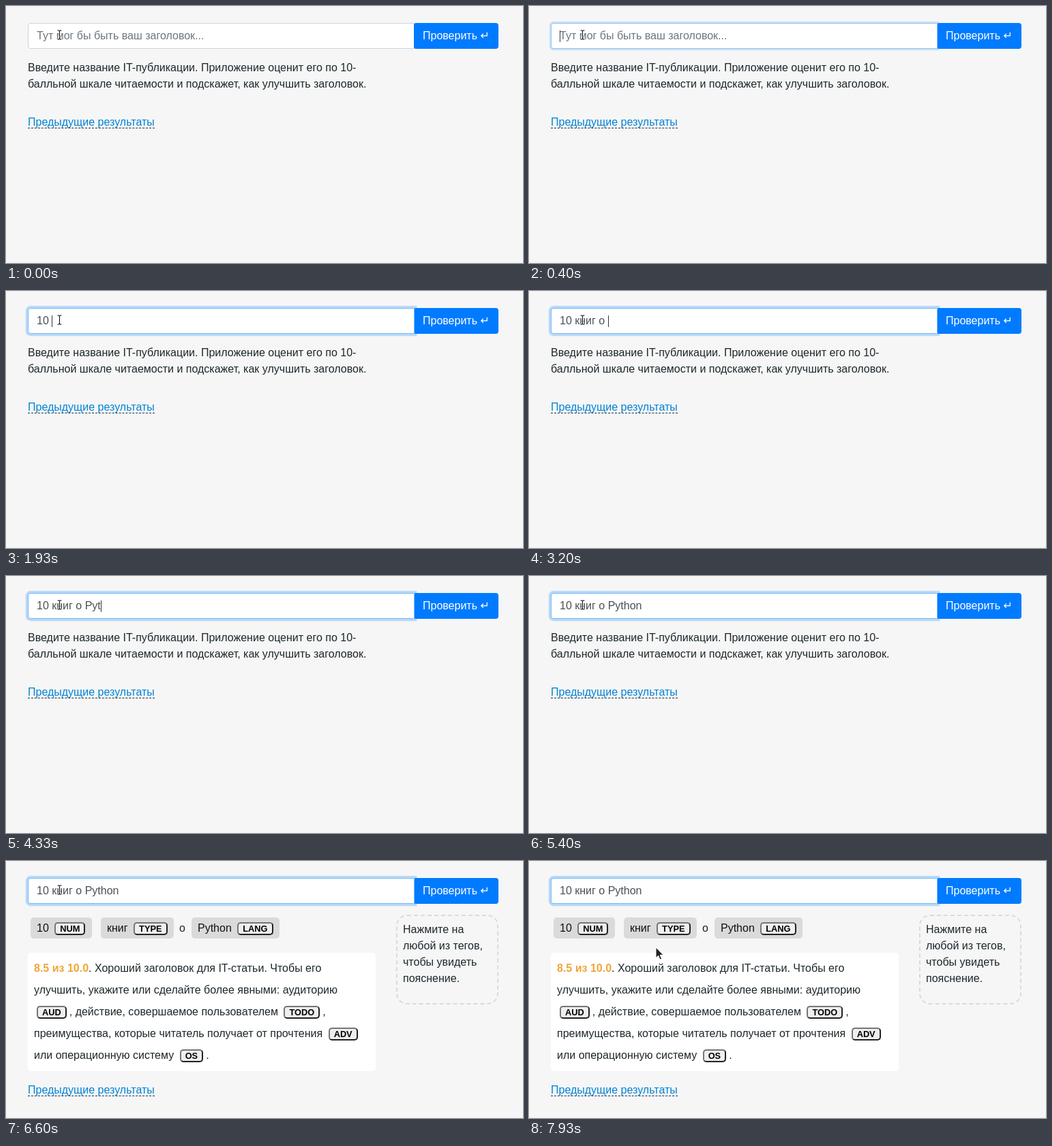
An HTML page for the animation above (8000 ms loop, 758 by 378 pixels).

```html
<!DOCTYPE html>
<html lang="ru">
<head>
<meta charset="utf-8">
<title>Оценка заголовка</title>
<style>
* { box-sizing: border-box; }
html, body { margin: 0; width: 100%; height: 100%; overflow: hidden; }
body {
  position: relative;
  background: #f6f6f6;
  color: #1d272c;
  font: 16px/24px "Liberation Sans", Arial, "DejaVu Sans", sans-serif;
}
.box, .line { position: absolute; white-space: pre; }
#field {
  left: 32px; top: 25px; width: 567px; height: 38px;
  padding: 6px 12px;
  background: #fff;
  border: 1px solid #ced4da;
  border-radius: 4px 0 0 4px;
  color: #495057;
}
#field.on { z-index: 3; }
#hint { color: #6c757d; }
#caret { position: absolute; top: 10px; width: 1px; height: 17px; background: #30373d; }
#check {
  left: 598px; top: 25px; width: 124px; height: 38px;
  padding: 7px 13px;
  background: #007bff;
  border-radius: 3px 4px 4px 3px;
  color: #fff;
  z-index: 2;
}
#link { left: 32px; color: #0083d6; }
#link span { border-bottom: 1px dashed #12304a; }
.tag { top: 83px; height: 31px; padding: 4px 9px; background: #dadada; border-radius: 5px; color: #111; }
kbd {
  display: inline-block;
  margin: 0 4px; padding: 0 6px;
  border: 2px solid; border-color: #767676 #222 #222 #767676;
  border-radius: 5px;
  background: #efefef; color: #000;
  font: bold 12.8px/15px "Liberation Sans", Arial, sans-serif;
}
#card { left: 32px; top: 135px; width: 510px; height: 174px; padding: 7px 9px; background: #fff; border-radius: 5px; line-height: 32px; }
#card div { height: 32px; }
#card b { color: #f0a63a; }
#side { left: 572px; top: 79px; width: 150px; height: 132px; padding: 8px; border: 2px dashed #dadada; border-radius: 16px; }
.mouse { position: absolute; left: 0; top: 0; overflow: visible; z-index: 9; }
</style>
</head>
<body>
<div id="field" class="box"><span id="typed"></span><i id="caret"></i><span id="hint">Тут мог бы быть ваш заголовок...</span></div>
<div id="check" class="box">Проверить ↵</div>

<div id="intro">
  <div class="line" style="left:32px;top:79px">Введите название IT-публикации. Приложение оценит его по 10-
балльной шкале читаемости и подскажет, как улучшить заголовок.</div>
</div>

<div id="result">
  <div class="box tag" style="left:36px;width:90px">10 <kbd>NUM</kbd></div>
  <div class="box tag" style="left:139px;width:107px">книг <kbd>TYPE</kbd></div>
  <div class="line" style="left:254px;top:87px">о</div>
  <div class="box tag" style="left:272px;width:129px">Python <kbd>LANG</kbd></div>
  <div id="card" class="box"><div><b>8.5 из 10.0</b>. Хороший заголовок для IT-статьи. Чтобы его</div><div>улучшить, укажите или сделайте более явными: аудиторию</div><div><kbd>AUD</kbd>, действие, совершаемое пользователем <kbd>TODO</kbd>,</div><div>преимущества, которые читатель получает от прочтения <kbd>ADV</kbd></div><div>или операционную систему <kbd>OS</kbd>.</div></div>
  <div id="side" class="box">Нажмите на
любой из тегов,
чтобы увидеть
пояснение.</div>
</div>

<div id="link" class="line"><span>Предыдущие результаты</span></div>

<svg id="beam" class="mouse" width="1" height="1" fill="none">
  <g id="stem"><path d="M-3 -6.5H-1L0 -5.5L1 -6.5H3M0 -5.5V5.5M-3 6.5H-1L0 5.5L1 6.5H3" stroke="#fff" stroke-width="2.6"/>
  <path d="M-3 -6.5H-1L0 -5.5L1 -6.5H3M0 -5.5V5.5M-3 6.5H-1L0 5.5L1 6.5H3" stroke="#111" stroke-width="1.1"/></g>
</svg>
<svg id="arrow" class="mouse" width="1" height="1">
  <path d="M0 0V15.5L3.6 12.2L6 18L8.6 16.9L6.2 11.3H11Z" fill="#222" stroke="#fff"/>
</svg>

<script>
const LOOP = 8000;
const TITLE = "10 книг о Python";
const $ = id => document.getElementById(id);

// Moment at which each character of the title is typed
const keys = [930, 1330, 1930, 2200, 2470, 2600, 2800, 2930,
              3070, 3200, 3930, 4200, 4330, 4470, 4600, 4800];
// [time, value]; each value holds until the next step
const caret = [[0, 0], [330, 1], [870, 0], [930, 1], [5400, 0],
               [6000, 1], [6600, 0], [7200, 1], [7800, 0]];
const focus = [[0, 0], [330, .1], [400, .7], [470, 1]];
const mouse = [[0, ["beam", 78.5, 42.5]], [7330, ["arrow", 84, 58.5]],
               [7470, ["arrow", 126, 132]], [7530, ["arrow", 150, 176]],
               [7730, ["arrow", 141, 150]], [7930, ["arrow", 186, 127]]];
const SHOW = 5530;

const at = (steps, t) => steps.filter(s => s[0] <= t).pop()[1];
const mix = (a, b, k) => a.map((v, i) => Math.round(v + (b[i] - v) * k));
const show = (id, on) => { $(id).style.display = on ? "" : "none"; };

function draw(t) {
  const count = keys.filter(k => k <= t).length;
  $("typed").textContent = TITLE.slice(0, count);
  show("hint", !count);
  show("caret", at(caret, t));

  const k = at(focus, t);
  const field = $("field");
  field.className = k ? "box on" : "box";
  field.style.borderColor = `rgb(${mix([206, 212, 218], [115, 185, 245], k)})`;
  field.style.boxShadow = k ? `0 0 0 ${3.2 * k}px rgba(0,123,255,${.25 * k})` : "none";

  const done = t >= SHOW;
  show("intro", !done);
  show("result", done);
  $("link").style.top = (done ? 325 : 159) + "px";

  const [kind, x, y] = at(mouse, t);
  show("beam", kind === "beam");
  show("arrow", kind === "arrow");
  $(kind).style.transform = `translate(${x}px, ${y}px)`;
}

const start = performance.now();
function tick() {
  draw((performance.now() - start) % LOOP);
  requestAnimationFrame(tick);
}
draw(0);
requestAnimationFrame(tick);
</script>
</body>
</html>
```
